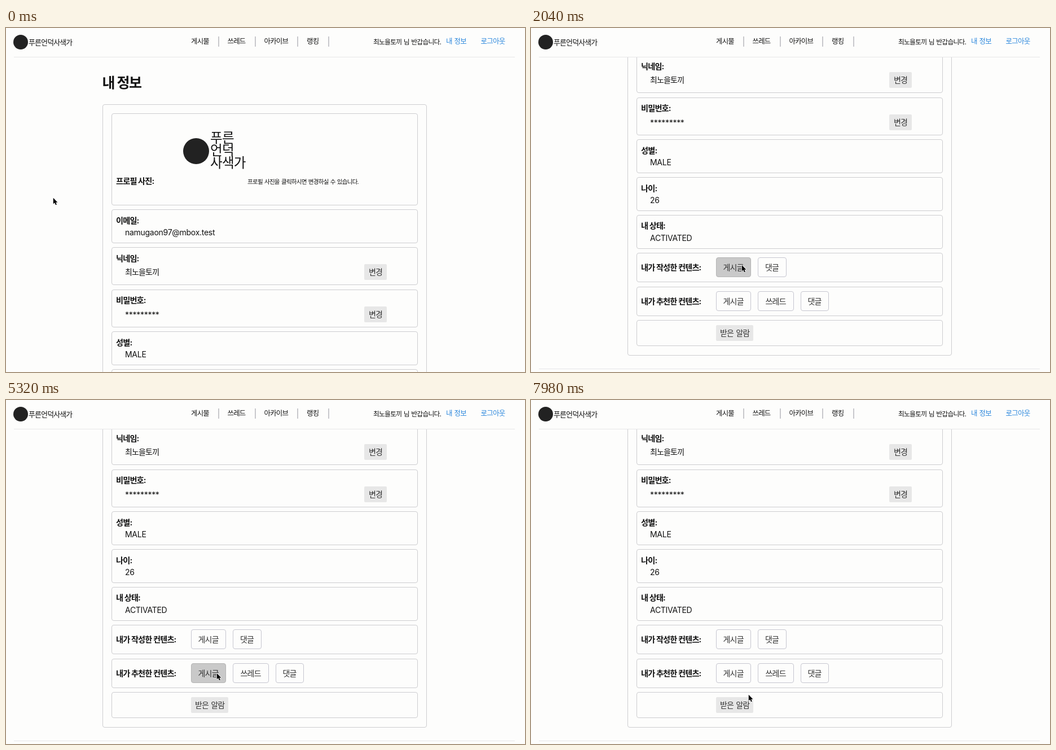
An HTML page that plays this animation: 920x609 px, repeating every 8 s.

```html
<!DOCTYPE html>
<html lang="ko">
<head>
<meta charset="utf-8">
<title>내 정보</title>
<style>
  html, body { margin: 0; width: 100%; height: 100%; overflow: hidden; background: #fdfdfc; }
  body { font-family: Inter, "Noto Sans CJK KR", "Noto Sans CJK", sans-serif; letter-spacing: -.05em; word-spacing: .06em; color: #111; }
  #stage { position: relative; width: 920px; height: 609px; overflow: hidden; }
  #stage div, #stage span, #stage svg { position: absolute; box-sizing: border-box; }
  span { line-height: 30px; white-space: pre; }
  .page { left: 0; top: 0; width: 920px; height: 1000px; }
  .box { border: 1px solid #cdcdd0; border-radius: 4px; }
  .cell { border: 1px solid #dcdce4; }
  .rule { left: 14px; width: 888px; height: 1px; background: #e6e6e8; }
  .fill { background: #e7e7e7; border-radius: 2px; }
  .outline { border: 1px solid #c6c6d0; border-radius: 4px; }
  .outline.hover { background: #c9c9c9; border-color: #b4b4b4; }
  .dot { background: #222; border-radius: 50%; }
  .mask { background: #fdfdfc; border-radius: 50%; }
  .sep { width: 2px; height: 18px; top: 15px; background: #c8c8cc; }
  .bold { font-weight: 700; letter-spacing: -.06em; word-spacing: 0; }
  .nav { letter-spacing: -.06em; }
  .latin { letter-spacing: -.02em; }
  .btn { color: #333; }
  .link { color: #2b87dc; }
  .term { color: #3a6fc0; }
  .num { color: #fff; }
  .red { background: #e96363; }
  #header { left: 0; top: 0; width: 920px; height: 52px; background: #fdfdfc; }
</style>
</head>
<body>
<div id="stage">
  <div id="info" class="page"></div>
  <div id="written" class="page"></div>
  <div id="liked" class="page"></div>
  <div id="header"></div>
  <div id="avatar" class="page"></div>
  <svg id="cursor" width="12.5" height="18" viewBox="-2 -2 14 20" style="left:-2px;top:-2px">
    <path d="M0 0V12L2.8 9.5L4.7 13.8L6.9 12.9L5 8.7H8.6Z" fill="#000" stroke="#fff" stroke-width="1.6" paint-order="stroke" stroke-linejoin="round"/>
  </svg>
</div>
<script>
const LOOP = 8000, SCROLL = 340;
const $ = id => document.getElementById(id);

const box = (cls, x, y, w, h) =>
  `<div class="${cls}" style="left:${x}px;top:${y}px;width:${w}px;height:${h}px"></div>`;
const dot = (cx, cy, r, cls = 'dot') => box(cls, cx - r, cy - r, 2 * r, 2 * r);
const text = (str, x, cy, size, cls = '') =>
  `<span class="${cls}" style="left:${x}px;top:${cy - 15}px;font-size:${size}px">${str}</span>`;
const rule = y => `<div class="rule" style="top:${y}px"></div>`;
const sep = x => `<div class="sep" style="left:${x}px"></div>`;
const label = (str, cy) => text(str, 195, cy, 14.2, 'bold');
const value = (str, cy, cls = 'latin') => text(str, 211, cy, 14, cls);
const button = (kind, str, x, y, w, h, pad) =>
  box(kind, x, y, w, h) + text(str, x + pad, y + h / 2, 14, 'btn');
const chevron = (x, cy, dir) =>
  `<svg style="left:${x}px;top:${cy - 7}px" width="9" height="14"><path d="${dir < 0 ? 'M7.5 1.5L2 7L7.5 12.5' : 'M1.5 1.5L7 7L1.5 12.5'}" fill="none" stroke="#111" stroke-width="2.2"/></svg>`;

$('header').innerHTML = dot(26, 24.5, 13) + text('푸른언덕사색가', 40, 26, 12.9) +
  text('게시물', 328, 24, 12.4, 'nav') + sep(376) + text('쓰레드', 392.5, 24, 12.4, 'nav') + sep(441) +
  text('아카이브', 457.5, 24, 12.4, 'nav') + sep(516) + text('랭킹', 533, 24, 12.4, 'nav') + sep(571) +
  text('최노을토끼 님 반갑습니다.', 651, 24.5, 11.8) +
  text('내 정보', 780, 24, 12.5, 'nav link') + text('로그아웃', 841.5, 24, 12.5, 'nav link') + rule(51);

const rows = [[151, 163], [321, 60], [388, 67], [463, 67], [537, 60], [604, 60], [671, 60], [738, 52], [798, 52], [857, 46]];
$('info').innerHTML = text('내 정보', 170.5, 97, 25, 'bold') + box('box', 171, 135, 575, 785) +
  rows.map(([y, h]) => box('box', 187, y, 543, h)).join('') +
  label('프로필 사진:', 271) + text('프로필 사진을 클릭하시면 변경하실 수 있습니다.', 428, 273, 10.6) +
  label('이메일:', 340.5) + value('namugaon97@mbox.test', 362) +
  label('닉네임:', 407.5) + value('최노을토끼', 432, 'nav') +
  label('비밀번호:', 482) + value('*********', 508) +
  label('성별:', 556.5) + value('MALE', 578) +
  label('나이:', 623.5) + value('26', 645) +
  label('내 상태:', 690) + value('ACTIVATED', 711.5) +
  label('내가 작성한 컨텐츠:', 764) + label('내가 추천한 컨텐츠:', 823.5) +
  [418, 493].map(y => button('fill', '변경', 635, y, 40, 28, 8)).join('') +
  button('outline', '게시글', 328, 746, 62, 35, 12.5) + button('outline', '댓글', 402, 746, 51, 35, 13) +
  button('outline', '게시글', 328, 806, 62, 35, 12.5) + button('outline', '쓰레드', 402, 806, 64, 35, 13.5) +
  button('outline', '댓글', 478, 806, 50, 35, 12.5) +
  button('fill', '받은 알람', 328, 866, 66, 28, 7) + rule(943);

// The round avatar scrolls with the page but stacks above the header.
$('avatar').innerHTML = dot(370, 217, 60, 'mask') + dot(337, 218, 23) +
  ['푸른', '언덕', '사색가'].map((s, i) => text(s, 362, 195 + 22 * i, 23.6)).join('');

function listPage(title, posts) {
  const end = 121 + 35 * posts.length;
  return text(title, 37, 86.5, 20.3, 'bold') +
    posts.map((p, i) => box('cell', 14, 121 + 35 * i, 888, 36) + text(p, 30, 138.5 + 35 * i, 12.5)).join('') +
    chevron(482.5, end + 25.5, -1) + chevron(546, end + 25.5, 1) +
    box('red', 508, end + 13, 22, 23) + text('1', 515.5, end + 24.5, 14, 'num') + rule(end + 52) +
    dot(367, end + 80, 16) + text('©푸른 언덕 사색가 2023', 401, end + 71.5, 11.6) +
    text('All Rights Reserved.', 401, end + 90, 11.6, 'latin') +
    text('서비스 이용약관 · 개인정보 처리방침', 401, end + 109, 11.4, 'term');
}
$('written').innerHTML = listPage('작성한 게시물', [
  '[철학]무지개 단추 누르시겠습니까??', '[논쟁]클래식하게 깻잎 논쟁에 대해 얘기해보고 싶습니다',
  '[예술]1234', '[사회]ㅂㅈㄷㄱㅍ', '[연애]DDD vs TDD vs BDD']);
$('liked').innerHTML = listPage('추천한 게시물', [
  '[논쟁]jpop을 좋아한다고 친일 소리를 들었습다', '[논쟁]탕수육 부먹 vs 찍먹', '[사회]욕설 필터링 관련 이슈',
  '[철학]테스트', '[논쟁]클래식하게 깻잎 논쟁에 대해 얘기해보고 싶습니다', '[예술]1234', '[논쟁]1221',
  '[철학]내일 점심 뭐 먹을까요?', '[연애]DDD vs TDD vs BDD']);

const views = [[0, 'info'], [2260, 'written'], [3700, 'info'], [5340, 'liked'], [6980, 'info']];
// Pointer stops: time, x, y
const stops = [[0, 84, 301], [400, 84, 302], [860, 86, 310], [1300, 88, 314], [1920, 374, 420], [2270, 374, 420],
  [2500, 340, 405], [2940, 330, 402], [3600, 322, 387], [4240, 322, 387], [4860, 374, 484], [5360, 374, 484],
  [5900, 386, 467], [7250, 386, 467], [7960, 386, 522], [LOOP, 386, 522]];

const smooth = p => { p = Math.min(1, Math.max(0, p)); return p * p * (3 - 2 * p); };

function pointer(t) {
  const i = stops.findIndex(s => s[0] > t), [t0, x0, y0] = stops[i - 1], [t1, x1, y1] = stops[i];
  const p = smooth((t - t0) / (t1 - t0));
  return [x0 + (x1 - x0) * p, y0 + (y1 - y0) * p];
}

const hoverables = [...document.querySelectorAll('.outline')].map(el =>
  ({ el, x: el.offsetLeft, y: el.offsetTop, w: el.offsetWidth, h: el.offsetHeight }));

function render(t) {
  const view = views.filter(v => v[0] <= t).pop()[1];
  const scroll = Math.round(SCROLL * smooth((t - 100) / 1170));
  const [x, y] = pointer(t);
  for (const id of ['info', 'written', 'liked']) $(id).style.visibility = id === view ? 'visible' : 'hidden';
  $('avatar').style.visibility = $('info').style.visibility;
  $('info').style.transform = $('avatar').style.transform = `translateY(${-scroll}px)`;
  $('cursor').style.transform = `translate(${Math.round(x)}px,${Math.round(y)}px)`;
  for (const b of hoverables) {
    const py = y + scroll;
    b.el.classList.toggle('hover', x >= b.x && x < b.x + b.w && py >= b.y && py < b.y + b.h);
  }
}

const start = performance.now();
function tick() {
  render((performance.now() - start) % LOOP);
  requestAnimationFrame(tick);
}
tick();
</script>
</body>
</html>
```
